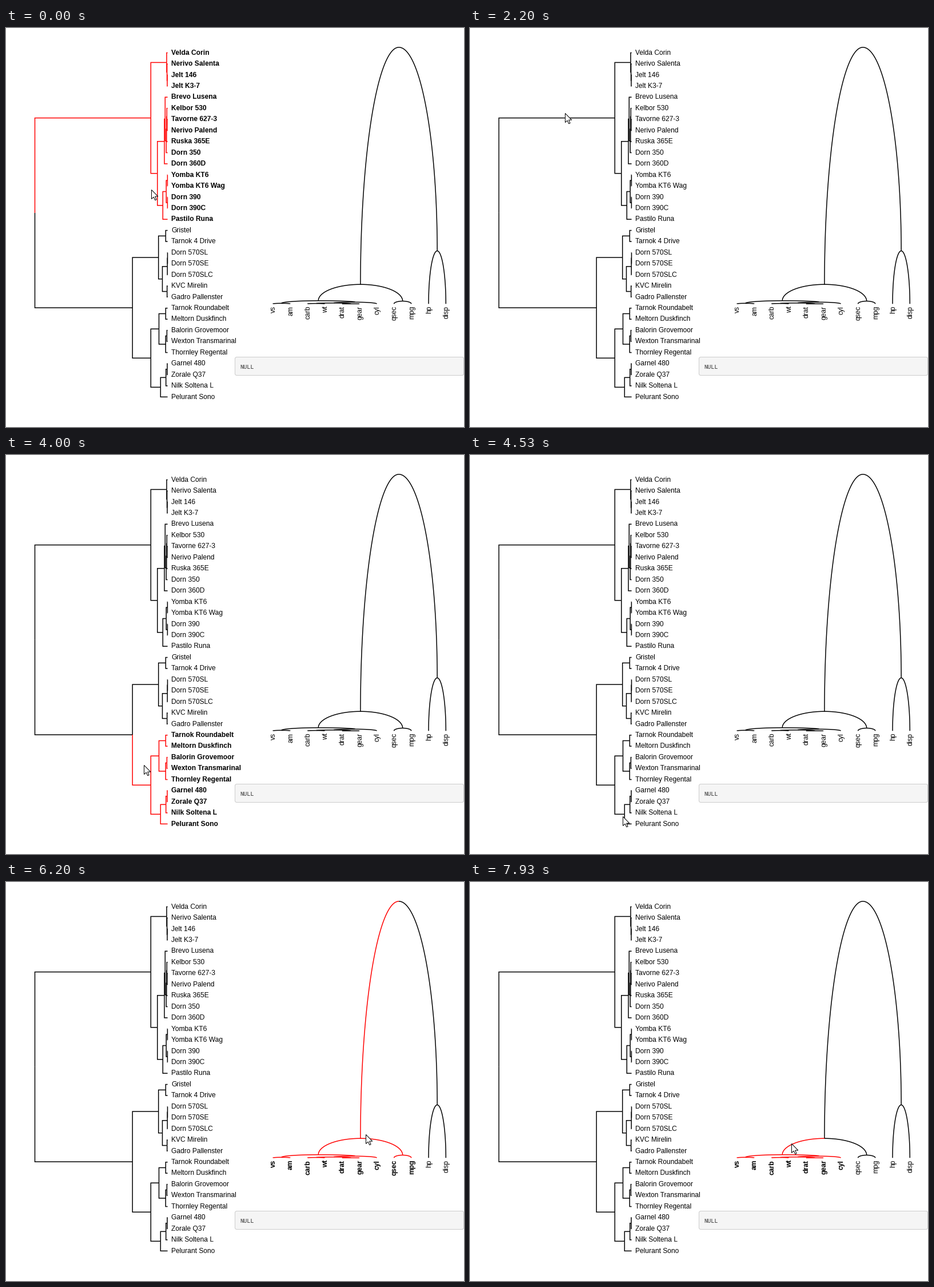
A matplotlib script that plays this animation: 801 px wide and 699 px high, repeating every 8 s.

```python
import numpy as np
import matplotlib.pyplot as plt
from matplotlib.animation import FuncAnimation
from matplotlib.patches import FancyBboxPatch, Polygon

W, H, DPI = 801, 699, 64
FRAMES, LOOP = 120, 8000
PX = 72 / DPI  # points per pixel

plt.rcParams["font.family"] = "Liberation Sans"

# Inner nodes are (depth, first child, second child); leaves are labels.
CARS = (50.5,
    (253.3,
        (281, "Velda Corin",
            (281.6, "Nerivo Salenta", (282, "Jelt 146", "Jelt K3-7"))),
        (264.8,
            (277,
                (278.3, "Brevo Lusena",
                    (280.2,
                        (280.8,
                            (281.3, "Kelbor 530",
                                (281.8, "Tavorne 627-3", "Nerivo Palend")),
                            "Ruska 365E"),
                        "Dorn 350")),
                "Dorn 360D"),
            (274.3,
                (280.2,
                    (282.4, "Yomba KT6", "Yomba KT6 Wag"),
                    (282.4, "Dorn 390", "Dorn 390C")),
                "Pastilo Runa"))),
    (221.2,
        (266.7,
            (279.3, "Gristel", "Tarnok 4 Drive"),
            (273.5,
                (282.2, (282.5, "Dorn 570SL", "Dorn 570SE"), "Dorn 570SLC"),
                (281.7, "KVC Mirelin", "Gadro Pallenster"))),
        (253.3,
            (267.5,
                (279.3, "Tarnok Roundabelt", "Meltorn Duskfinch"),
                (279.2,
                    (281.4, "Balorin Grovemoor", "Wexton Transmarinal"),
                    "Thornley Regental")),
            (270.3,
                (279.7, (282, "Garnel 480", "Zorale Q37"), "Nilk Soltena L"),
                "Pelurant Sono"))))

VARS = (33.8,
    (449.2,
        (477.8,
            (482.3, "vs", "am"),
            (480.3,
                (481.8, (482.6, "carb", "wt"), (483.2, "drat", "gear")),
                "cyl")),
        (478.5, "qsec", "mpg")),
    (390.5, "hp", "disp"))

# (first frame, tree, highlighted branch); a branch is its path of child indices
HOVER = [
    (0, "cars", "0"), (4, "", ""), (6, "cars", "01"), (10, "cars", "010"),
    (19, "", ""), (21, "cars", "00"), (28, "", ""), (29, "cars", "0"),
    (32, "", ""), (42, "cars", "0"), (49, "", ""), (51, "cars", "1"),
    (57, "", ""), (58, "cars", "11"), (63, "cars", "111"), (67, "", ""),
    (80, "vars", "00"), (88, "", ""), (90, "vars", "0"), (101, "", ""),
    (106, "vars", "1"), (114, "", ""), (117, "vars", "00"),
]

# frame, x, y of the pointer tip
TRAIL = np.array([
    (0, 254, 283), (3, 255, 271), (4, 255, 271), (7, 257, 247),
    (10, 264, 222), (13, 268, 203), (15, 269, 198), (18, 267, 182),
    (21, 262, 120), (24, 259, 92), (26, 257, 100), (29, 232, 150),
    (31, 196, 160), (33, 166, 149), (37, 148, 145), (40, 148, 145),
    (44, 125, 190), (48, 100, 270), (51, 82, 380), (54, 105, 455),
    (57, 175, 500), (60, 241, 543), (63, 255, 600), (66, 258, 639),
    (70, 295, 616), (74, 358, 558), (77, 425, 494), (79, 541, 463),
    (83, 556, 465), (85, 556, 465), (89, 590, 455), (93, 629, 442),
    (98, 655, 410), (103, 705, 340), (107, 736, 292), (111, 739, 280),
    (114, 700, 375), (117, 592, 452), (119, 531, 464),
])

ARROW = np.array([(0, 0), (0, 16), (3.7, 12.6), (6.3, 18.2), (8.6, 17.2),
                  (6.2, 11.6), (11.3, 11.6)])

fig = plt.figure(figsize=(W / DPI, H / DPI), dpi=DPI, facecolor="white")
ax = fig.add_axes([0, 0, 1, 1])
ax.set_xlim(0, W)
ax.set_ylim(H, 0)
ax.axis("off")


def elbow(parent, child):
    (d0, p0), (d1, p1) = parent, child
    return [d0, d0, d1], [p0, p1, p1]


def arc(parent, child):
    (d0, p0), (d1, p1) = parent, child
    a = np.linspace(0, np.pi / 2, 50)
    return p0 + (p1 - p0) * np.sin(a), d1 + (d0 - d1) * np.cos(a)


def car_label(pos, name):
    return ax.text(289, pos + 3.3, name, fontsize=12 * PX, va="baseline")


def var_label(pos, name):
    return ax.text(pos + 4, 487, name, fontsize=12 * PX, rotation=90,
                   rotation_mode="anchor", ha="right", va="baseline")


class Tree:
    def __init__(self, data, start, step, leaf_depth, edge, label):
        self.next, self.step, self.leaf_depth = start, step, leaf_depth
        self.edge, self.label = edge, label
        self.lines, self.labels = {}, {}
        self.build(data, "")

    def build(self, node, path):
        if isinstance(node, str):
            pos = self.next
            self.next += self.step
            self.labels[path] = self.label(pos, node)
            return self.leaf_depth, pos
        kids = [self.build(kid, path + str(i)) for i, kid in enumerate(node[1:])]
        here = node[0], (kids[0][1] + kids[1][1]) / 2
        for i, kid in enumerate(kids):
            self.lines[path + str(i)], = ax.plot(
                *self.edge(here, kid), color="black", lw=1.5 * PX, snap=False,
                solid_capstyle="butt", solid_joinstyle="miter")
        return here

    def highlight(self, branch):
        def inside(path):
            return bool(branch) and path.startswith(branch)

        for path, line in self.lines.items():
            line.set_color("red" if inside(path) else "black")
            line.set_zorder(3 if inside(path) else 2)
        for path, text in self.labels.items():
            text.set_weight("bold" if inside(path) else "normal")


trees = {
    "cars": Tree(CARS, 43.4, 19.45, 282.6, elbow, car_label),
    "vars": Tree(VARS, 466.8, 30.25, 483.3, arc, var_label),
}

ax.add_patch(FancyBboxPatch(
    (400.5, 576.5), 400, 32, boxstyle="round,pad=0,rounding_size=3",
    fc="#f5f5f5", ec="#cccccc", lw=PX, snap=False))
ax.text(409, 597, "NULL", fontsize=10.3 * PX, family="Liberation Mono",
        color="#333333", va="baseline")

pointer = ax.add_patch(Polygon(ARROW, fc="white", ec="black", lw=PX,
                               joinstyle="miter", zorder=10, snap=False))


def draw(n):
    tree, branch = [h[1:] for h in HOVER if h[0] <= n][-1]
    for name, t in trees.items():
        t.highlight(branch if name == tree else "")
    tip = [np.round(np.interp(n, TRAIL[:, 0], TRAIL[:, k])) for k in (1, 2)]
    pointer.set_xy(ARROW + np.array(tip) + 0.5)
    return []


anim = FuncAnimation(fig, draw, frames=FRAMES, interval=LOOP / FRAMES,
                     init_func=lambda: draw(0), repeat=True, repeat_delay=0)
plt.show()
```
